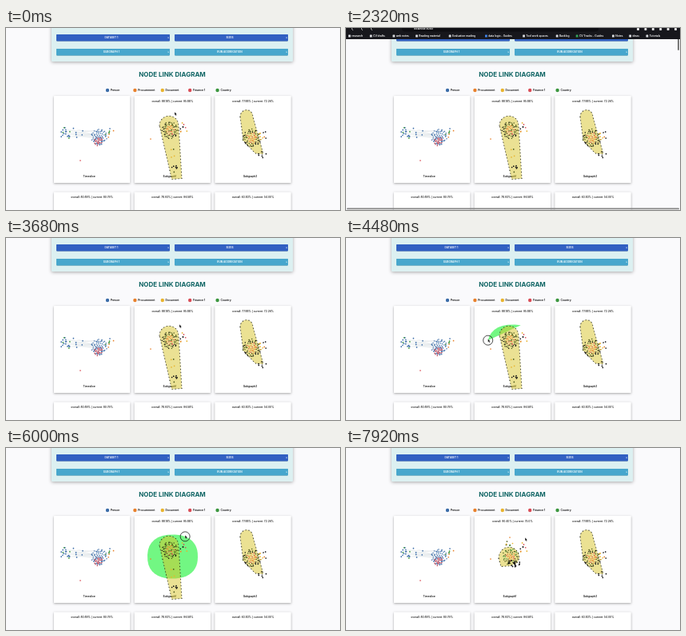
Animation of 418x228 px, one loop 8000 ms. Source, as an HTML page:

```html
<!DOCTYPE html>
<html lang="en">
<head>
<meta charset="utf-8">
<title>Node link diagram</title>
<style>
html, body { margin: 0; width: 100%; height: 100%; overflow: hidden; background: #fafafc; }
svg { display: block; width: 418px; height: 228px; }
text { font-family: Inter, sans-serif; font-size: 3.25px; font-weight: 500; fill: #111; text-anchor: middle; }
.title { font-size: 8px; font-weight: 700; fill: #0f6564; }
.left { text-anchor: start; }
.legend { font-size: 3.4px; font-weight: 600; }
.caption { font-weight: 600; }
.light { fill: #fff; font-weight: 600; }
.card { fill: #fff; filter: drop-shadow(0 1px 1.6px #0005); }
.panel { fill: #dcf0f1; filter: drop-shadow(0 1px 2px #0005); }
.button { filter: drop-shadow(0 .7px .6px #0006); }
.hull { fill: #d7c328; fill-opacity: .5; stroke: #77752a; stroke-width: .15; }
</style>
</head>
<body>
<svg id="stage" viewBox="0 0 418 228"></svg>
<script>
const LOOP = 8000;
const stage = document.getElementById('stage');
const BLUE = '#3a6ca8', ORANGE = '#e8802c', GOLD = '#e9b32c', RED = '#d94b55', GREEN = '#3b963e', BLACK = '#111', OLIVE = '#4b5a1c';

function add(parent, tag, attrs = {}, content) {
  const el = document.createElementNS('http://www.w3.org/2000/svg', tag);
  for (const key in attrs) el.setAttribute(key, attrs[key]);
  if (content) el.textContent = content;
  parent.append(el);
  return el;
}
const group = () => add(stage, 'g');
const rect = (p, x, y, width, height, attrs) => add(p, 'rect', { x, y, width, height, ...attrs });
const label = (p, x, y, content, cls = '') => add(p, 'text', { x, y, class: cls }, content);
const dot = (p, x, y, fill, r = .85) => add(p, 'circle', { cx: x, cy: y, r, fill });
const show = (el, on) => el.setAttribute('visibility', on ? 'visible' : 'hidden');

let seed = 4177;
const random = () => (seed = (seed * 16807) % 2147483647) / 2147483647;
const pick = list => list[Math.floor(random() * list.length)];

// Loose dots, spread evenly over an ellipse.
function scatter(p, count, cx, cy, rx, ry, colors) {
  for (let i = 0; i < count; i++) {
    const angle = random() * Math.PI * 2, far = Math.sqrt(random());
    dot(p, cx + Math.cos(angle) * far * rx, cy + Math.sin(angle) * far * ry, pick(colors));
  }
}
// A packed disc: a core of one set of colours inside a ring of another.
function disc(p, count, cx, cy, radius, core, ring) {
  for (let i = 0; i < count; i++) {
    const far = Math.sqrt((i + .5) / count), angle = i * 2.4 + random() * .4;
    const reach = radius * (far + random() * .12 - .06);
    dot(p, cx + Math.cos(angle) * reach, cy + Math.sin(angle) * reach, pick(far < .6 ? core : ring), .75);
  }
}
// A half-ellipse on top, closed through the tail points, with dots along the edge.
function hull(p, cx, cy, rx, ry, tail) {
  const points = Array.from({ length: 9 }, (_, i) => {
    const angle = Math.PI * (1 + i / 8);
    return [cx + rx * Math.cos(angle), cy + ry * Math.sin(angle)];
  }).concat(tail);
  const outline = add(p, 'polygon', { points: points.join(' '), class: 'hull' });
  const length = outline.getTotalLength();
  for (let at = 0; at < length; at += 4) {
    const { x, y } = outline.getPointAtLength(at);
    dot(p, x, y, BLACK, .55);
  }
}

// Page
rect(stage, 0, 0, 418, 228, { fill: '#fafafc' });
rect(stage, 57, -6, 302, 48, { class: 'panel', rx: 1 });
['DATASET 1', 'SIZES', 'SUBGRAPH 1', 'RUN AGGREGATION'].forEach((name, i) => {
  const x = i % 2 ? 211 : 63, y = i < 2 ? 8 : 26;
  rect(stage, x, y, 142, 8.4, { fill: i < 2 ? '#3160c2' : '#47a7cd', rx: .8, class: 'button' });
  label(stage, x + 69, y + 5.2, name, 'light');
  add(stage, 'path', { d: `M${x + 139.2} ${y + 3.8}h1.8l-.9 1.1z`, fill: '#fff' });
});
label(stage, 208, 60.8, 'NODE LINK DIAGRAM', 'title');
['Person', 'Procurement', 'Document', 'Finance 1', 'Country'].forEach((name, i) => {
  const x = 127 + i * 34.4;
  dot(stage, x, 78, [BLUE, ORANGE, GOLD, RED, GREEN][i], 2.2);
  label(stage, x + 3.8, 79.2, name, 'left legend');
});

const score = (x, y, overall, current) => label(stage, x, y, `overall: ${overall}% | current: ${current}%`);
const columnX = i => 107.6 + i * 100.7;
for (let i = 0; i < 3; i++) for (const y of [85, 205.5]) rect(stage, columnX(i) - 47.6, y, 95.3, 109, { class: 'card', rx: .6 });
const scoreText = score(columnX(1), 93.2, '88.18', '95.88');
score(columnX(2), 93.2, '77.88', '72.26');
score(columnX(0), 212.9, '80.89', '80.79');
score(columnX(1), 212.9, '78.93', '96.58');
score(columnX(2), 212.9, '63.83', '54.00');
const selection = rect(stage, 204, 183.3, 9, 4.6, { fill: '#acd0fa' });
['Timeslice', 'Subgraph1', 'Subgraph2'].forEach((name, i) => label(stage, columnX(i) - 3.4, 187, name, 'caption'));

// First graph
const overview = group();
for (let i = 0; i < 24; i++) {
  add(overview, 'line', {
    x1: 66 + random() * 28, y1: 126 + random() * 11, x2: 107 + random() * 16, y2: 128 + random() * 12,
    stroke: '#c3c9d0', 'stroke-width': .2, opacity: .6
  });
}
scatter(overview, 24, 80, 131, 17, 7, [BLUE, BLUE, BLUE, BLUE, GREEN]);
disc(overview, 62, 116.5, 136, 10, [BLUE], [BLUE]);
disc(overview, 34, 115.5, 142, 6, [RED], [RED, RED, BLUE]);
scatter(overview, 8, 131, 131, 7, 8, [BLUE, GREEN, ORANGE]);
dot(overview, 93, 166, RED);

const lasso = add(stage, 'polygon', { fill: '#66f779', 'fill-opacity': .92 });

// Middle graph before and after the selection
const before = group();
hull(before, 204, 122, 12, 12, [[220, 188.5], [207.5, 189.5]]);
disc(before, 76, 205.3, 128, 10.5, [ORANGE, ORANGE, RED, OLIVE], [OLIVE, OLIVE, BLACK]);
scatter(before, 7, 211, 176, 4, 6, [OLIVE, BLACK, GOLD]);
scatter(before, 4, 209, 154, 4, 9, [OLIVE, GOLD]);

const after = group();
hull(after, 204, 138, 13, 14, [[214, 144], [206, 147.5], [194, 148.5]]);
disc(after, 62, 206, 136, 10, [ORANGE, ORANGE, RED, OLIVE], [OLIVE, OLIVE, GREEN]);
scatter(after, 22, 210, 144, 8, 5, [BLACK]);
scatter(after, 7, 205, 120, 6, 4, [GREEN, GOLD, OLIVE]);
dot(after, 205, 112, ORANGE);

const strays = group();
scatter(strays, 7, 222.5, 127, 4.5, 9, [BLACK, ORANGE, RED, GOLD]);
dot(strays, 221.5, 124, BLACK, 1);
dot(strays, 181, 139, ORANGE);

// Last graph
const side = group();
hull(side, 301, 111, 8, 8.5, [[322, 158], [312, 157], [297, 141]]);
disc(side, 78, 307.5, 138, 11.5, [ORANGE, ORANGE, RED, OLIVE], [OLIVE, OLIVE, BLACK]);
scatter(side, 9, 323, 134, 7, 9, [BLACK, ORANGE, GOLD]);
scatter(side, 6, 320, 159, 6, 4, [BLACK]);

// Scroll bars, browser bar and pointer
const scrollbars = group();
rect(scrollbars, 415, 5, 2, 23, { rx: 1, fill: '#777' });
rect(scrollbars, 1, 225.5, 416, 1.8, { rx: .9, fill: '#858585' });

const browser = group();
rect(browser, 0, -30, 418, 44, { fill: '#17171c' });
rect(browser, 70, -3.5, 246, 8, { rx: 4, fill: '#0e0e12' });
label(browser, 85, 2.2, 'localhost:8080', 'left light');
for (let i = 0; i < 3; i++) add(browser, 'path', { d: `M${9 + i * 12}-1l-2 2 2 2`, fill: 'none', stroke: '#ddd', 'stroke-width': .7 });
for (let i = 0; i < 6; i++) rect(browser, 364 + i * 9.4, 0, 3, 3, { rx: .8, fill: '#e4e4e4' });
let markX = 3;
for (const name of ['research', 'CV drafts', 'web notes', 'Reading material', 'Evaluation reading', 'data logic - Guides',
  'Tool work spaces', 'Backlog', 'CV Tracks - Guides', 'Notes', 'ideas', 'Tutorials']) {
  const fill = name.startsWith('data') ? '#4285e8' : name.startsWith('CV T') ? '#35a45a' : '#dadce0';
  rect(browser, markX, 8.6, 2.8, 2.8, { rx: .5, fill });
  label(browser, markX + 4.2, 11.2, name, 'left light');
  markX += name.length * 1.85 + 12;
}

const brush = add(stage, 'circle', { r: 6, fill: 'none', stroke: '#111', 'stroke-width': .75 });
const pointer = add(stage, 'path', { d: 'M0-1.7V2.3L.9 1.5 1.6 3 2.3 2.7 1.7 1.3H2.9Z', fill: '#000', stroke: '#fff', 'stroke-width': .25 });

// Motion
const DRAW_START = 4160, DRAW_END = 6000, RELEASE = 6320, UPDATE = 6800;
const progress = (t, from, to) => Math.min(1, Math.max(0, (t - from) / (to - from)));
const smooth = u => u * u * (3 - 2 * u);
const mix = (a, b, u) => a + (b - a) * u;
// Rises to 1, stays, and falls back to 0.
const pulse = (t, inFrom, inTo, outFrom, outTo) => smooth(progress(t, inFrom, inTo)) - smooth(progress(t, outFrom, outTo));

// One slowing anticlockwise turn along a slightly squared ellipse.
function lassoPoint(t) {
  const turn = 1 - Math.pow(1 - progress(t, DRAW_START, DRAW_END), 1.6);
  const angle = -1.3 - 6.1 * turn;
  const square = v => Math.sign(v) * Math.pow(Math.abs(v), .85);
  return [208.5 + 31.5 * square(Math.cos(angle)), 136 + 27.5 * square(Math.sin(angle))];
}
function pointerPoint(t) {
  if (t >= DRAW_START) {
    const [x, y] = lassoPoint(t);
    return [x, y + 3 * progress(t, RELEASE, UPDATE)];
  }
  const away = pulse(t, 1680, 2160, 2640, 3280);
  return [mix(211, 217, progress(t, 2640, 3280)), mix(mix(107, 110, progress(t, 2640, 3280)), -6, away)];
}

function render(t) {
  const [x, y] = pointerPoint(t);
  pointer.setAttribute('transform', `translate(${x} ${y})`);
  brush.setAttribute('cx', x);
  brush.setAttribute('cy', y);
  show(brush, t >= DRAW_START && t < RELEASE);
  show(selection, t >= 4800 && t < 5280);

  const trail = [];
  for (let at = DRAW_START; at < Math.min(t, DRAW_END); at += 40) trail.push(lassoPoint(at));
  trail.push(lassoPoint(t));
  lasso.setAttribute('points', trail.join(' '));

  const updated = t >= UPDATE;
  show(lasso, t >= DRAW_START && !updated);
  show(before, !updated);
  show(after, updated);
  scoreText.textContent = updated ? 'overall: 90.40% | current: 75.0%' : 'overall: 88.18% | current: 95.88%';

  scrollbars.setAttribute('opacity', pulse(t, 960, 1200, 2960, 3200));
  browser.setAttribute('transform', `translate(0 ${-15 + 15 * pulse(t, 2000, 2280, 2480, 2800)})`);
}
const start = performance.now();
function tick() {
  render((performance.now() - start) % LOOP);
  requestAnimationFrame(tick);
}
tick();
</script>
</body>
</html>
```
